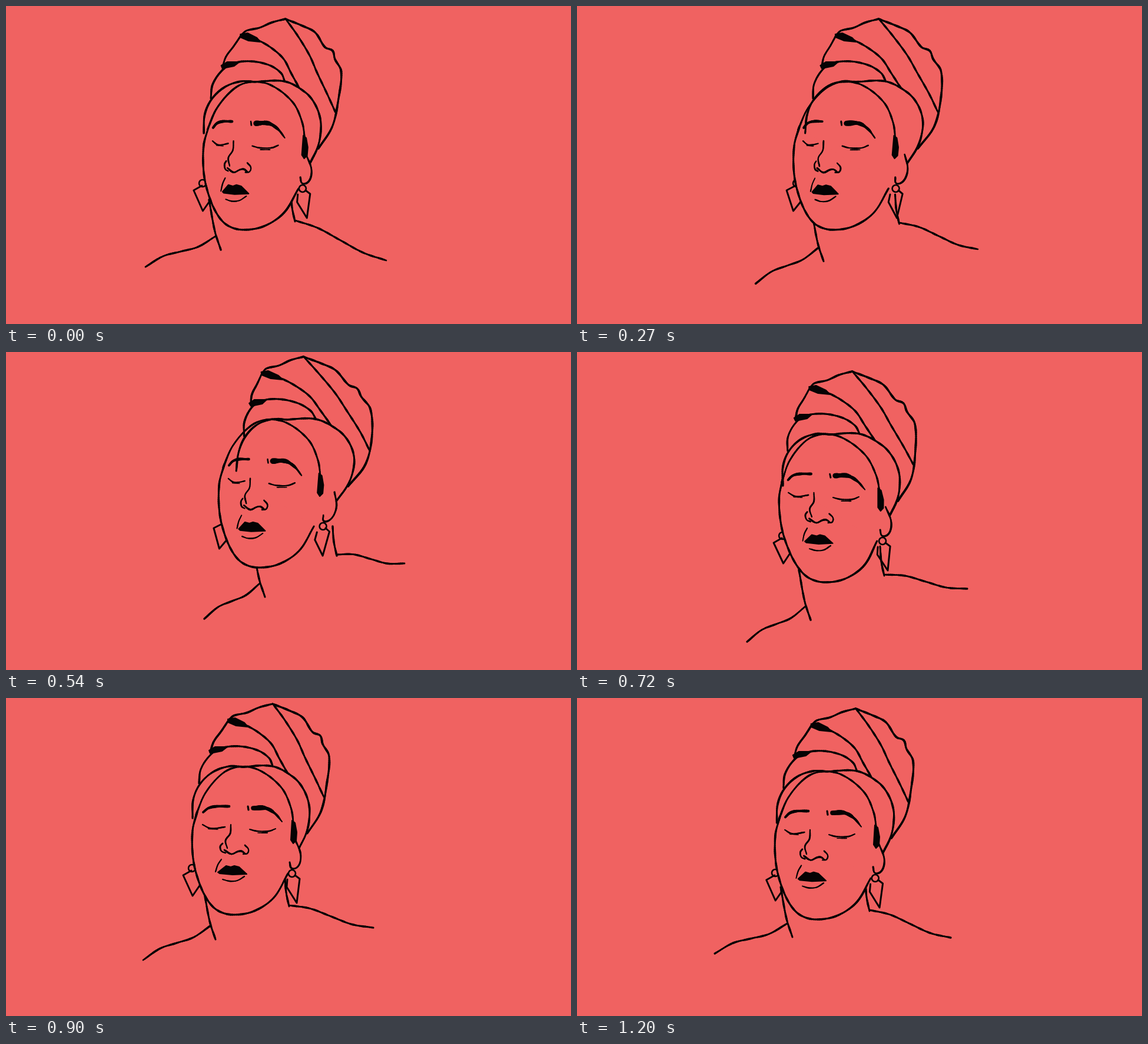
Animation, 960 px wide and 540 px high, one loop 1290 ms. Source, as an HTML page with a canvas:

```html
<!DOCTYPE html>
<html lang="en">
<head>
<meta charset="utf-8">
<title>Swaying singer</title>
<style>
html, body { margin: 0; width: 100%; height: 100%; overflow: hidden; background: #f06261; }
canvas { display: block; }
</style>
</head>
<body>
<canvas id="stage" width="960" height="540"></canvas>
<script>
const ctx = document.getElementById('stage').getContext('2d');
const PAPER = '#f06261', INK = '#050304', LOOP = 1290;
ctx.lineCap = ctx.lineJoin = 'round';

// head: chin x, chin y, face turn, turban turn, lean
// left, right: neck base and shoulder tip
const poses = [
  { head: [402, 380, 1.2, 0, .013], left: [356, 391, 237, 443], right: [491, 364, 646, 432] },
  { head: [425, 394, 1.25, .45, .025], left: [390, 416, 268, 485], right: [527, 380, 668, 432] },
  { head: [442, 366, 1.3, .95, .025], left: [430, 405, 339, 458], right: [568, 356, 694, 394] },
  { head: [428, 366, 1.05, 1.1, .017], left: [431, 393, 337, 453], right: [562, 344, 677, 359] },
  { head: [420, 391, .45, .3, -.06], left: [388, 432, 289, 492], right: [522, 378, 663, 402] },
  { head: [385, 368, 0, 0, 0], left: [347, 387, 233, 445], right: [481, 352, 624, 390] },
  { head: [405, 376, .5, .1, 0], left: [357, 383, 234, 434], right: [497, 360, 635, 407] }
];

// start time, position between poses, sway x, sway y
const steps = [
  [0, 0], [60, .5], [150, 1], [270, 1.5], [360, 2], [450, 2.5, 0, -6], [540, 3],
  [630, 3.5, 9, 30], [720, 4], [810, 4.5], [900, 5], [1020, 5.25, -12, -10],
  [1110, 5.5, -19, -15], [1200, 6]
];

const pairs = flat => flat.flatMap((v, i) => i % 2 ? [] : [[v, flat[i + 1]]]);

// Smooth brush line with uneven pressure; taper thins the far end.
function brush(pts, width, taper = 0) {
  const last = pts.length - 1;
  const dir = pts.map((p, i) => {
    const a = pts[Math.max(i - 1, 0)], b = pts[Math.min(i + 1, last)];
    const len = Math.hypot(b[0] - a[0], b[1] - a[1]) || 1;
    return [(b[0] - a[0]) / len, (b[1] - a[1]) / len];
  });
  let from = pts[0];
  for (let i = 0; i < last; i++) {
    const a = pts[i], b = pts[i + 1];
    const len = Math.hypot(b[0] - a[0], b[1] - a[1]), n = Math.ceil(len / 4) + 1;
    for (let k = 1; k <= n; k++) {
      const t = k / n, s = 1 - t;
      const to = [0, 1].map(c => s * s * s * a[c] + t * t * t * b[c]
        + 3 * s * s * t * (a[c] + dir[i][c] * len / 3)
        + 3 * s * t * t * (b[c] - dir[i + 1][c] * len / 3));
      const pressure = 1 + .13 * Math.sin(to[0] * .31 + to[1] * .23);
      ctx.lineWidth = width * pressure * (1 - taper * (i + t) / last);
      ctx.beginPath();
      ctx.moveTo(...from);
      ctx.lineTo(...to);
      ctx.stroke();
      from = to;
    }
  }
}

function polygon(pts, fill, width) {
  ctx.beginPath();
  pts.forEach(p => ctx.lineTo(...p));
  ctx.lineWidth = width;
  ctx.fillStyle = fill;
  if (fill) {
    ctx.closePath();
    ctx.fill();
  }
  if (width) ctx.stroke();
}

function hoop([[x, y]], r) {
  ctx.lineWidth = 2.6;
  ctx.beginPath();
  ctx.arc(x, y, r, 0, 7);
  ctx.stroke();
}

// Shoulder and neck side; bend sets the S-curve, neck the offsets from its base.
function drawSide([x, y, tipX, tipY], bend, neck) {
  const shoulder = [0, .25, .5, .75, 1].map(t =>
    [x + (tipX - x) * t, y + (tipY - y) * t + bend * Math.sin(2 * Math.PI * t)]);
  brush(shoulder, 3.1);
  brush(pairs(neck).map(([dx, dy]) => [x + dx, y + dy]), 3.2);
}

function drawHead([chinX, chinY, faceTurn, wrapTurn, lean]) {
  // Features slide sideways and shorten on the far side; the turban swings around the head.
  const zones = {
    head: (x, y) => [x, y],
    face: (x, y) => [x - faceTurn * (12 + Math.min(0, x + 10) / 4), y + faceTurn * .055 * (y + 185)],
    wrap: (x, y) => [x + wrapTurn * 28 * Math.sin(Math.PI * y / 400) ** 2, y]
  };
  const place = (zone, flat) => pairs(flat).map(p => {
    const [x, y] = zones[zone](...p);
    return [chinX + x - lean * y, chinY + y];
  });
  const line = (zone, width, flat, taper) => brush(place(zone, flat), width, taper);
  const blob = (zone, flat) => polygon(place(zone, flat), INK, 2);
  const earring = (hook, drop) => {
    hoop(place('wrap', hook), 6);
    polygon(place('wrap', drop), null, 3);
  };

  // far earring, hidden by the cheek as the head turns
  earring([-69, -79], [-70, -75, -84, -67, -68, -32, -55, -51]);
  const jaw = [-60, -175, -68, -143, -67, -95, -57, -55, -42, -24, -25, -7, 0, 0, 36, -6, 70, -29, 94, -70];
  polygon(place('head', jaw), PAPER, 0);
  line('head', 3.3, jaw);
  line('head', 3, [-62, -170, -46, -207, -17, -240, 10, -251, 44, -246, 82, -217, 99, -182, 104, -150]);
  blob('head', [101, -160, 106, -156, 109, -140, 108, -126, 103, -121, 99, -127]);

  // turban band
  line('wrap', 3.3, [-68, -164, -67, -195, -56, -221, -34, -242, -6, -252, 20, -251]);
  line('wrap', 3.3, [15, -251, 68, -252, 104, -233, 121, -212, 130, -186, 130, -160, 125, -138, 113, -113]);
  // folds
  line('wrap', 3.2, [-57, -223, -54, -247, -38, -271, -19, -283, 12, -286, 43, -279, 62, -266, 68, -253]);
  line('wrap', 3.2, [-38, -276, -32, -294, -19, -312, -7, -330]);
  line('wrap', 3.2, [-4, -331, 24, -321, 46, -308, 66, -290, 79, -266, 93, -241]);
  blob('wrap', [-8, -332, 4, -334, 20, -326, 26, -319, 6, -321, -8, -327]);
  blob('wrap', [-40, -279, -30, -285, -9, -285, -18, -278, -38, -274]);
  // crown and seam
  line('wrap', 3.3, [-6, -331, 2, -338, 24, -343, 45, -352, 68, -358]);
  line('wrap', 3.5, [68, -358, 98, -346, 119, -335, 136, -310, 149, -304, 153, -290,
    164, -269, 160, -222, 150, -175, 127, -138]);
  line('wrap', 3.1, [70, -356, 89, -330, 110, -296, 123, -267, 141, -230, 155, -200]);
  // ear
  line('wrap', 3, [106, -128, 115, -106, 115, -90, 109, -80, 100, -79, 97, -89]);
  earring([101, -70], [93, -60, 92, -47, 109, -20, 114, -61, 106, -67]);

  // brows and closed eyes
  line('face', 4.4, [-50, -174, -41, -181, -27, -184, -6, -184]);
  line('face', 9, [35, -181, 56, -181, 72, -172, 84, -158], .75);
  line('face', 2.8, [26, -184, 27, -178]);
  line('face', 2.4, [-51, -153, -39, -147, -27, -147, -13, -149]);
  line('face', 2.4, [29, -145, 41, -142, 62, -142, 73, -146]);
  line('face', 1.8, [-41, -146, -25, -145]);
  line('face', 1.8, [43, -139, 59, -139]);
  // nose
  line('face', 2.5, [-3, -153, -4, -138, -12, -126, -9, -113]);
  line('face', 2.5, [-17, -121, -21, -116, -19, -108, -12, -105]);
  line('face', 3, [-14, -110, -2, -103, 8, -107, 15, -108, 21, -104]);
  line('face', 2.5, [21, -118, 27, -111, 25, -104, 18, -103]);
  // mouth
  blob('face', [-25, -72, -11, -83, -3, -81, 3, -83, 11, -81, 24, -69, 0, -68, -22, -70]);
  line('face', 2.2, [-17, -60, -5, -57, 8, -58, 20, -65]);
  line('face', 2, [-19, -94, -25, -85, -29, -73]);
}

function drawStep([, at, dx = 0, dy = 0]) {
  const i = Math.floor(at), a = poses[i], b = poses[Math.ceil(at)];
  const mix = key => a[key].map((v, n) => v + (b[key][n] - v) * (at - i));
  ctx.setTransform(1, 0, 0, 1, 0, 0);
  ctx.fillStyle = PAPER;
  ctx.fillRect(0, 0, 960, 540);
  ctx.strokeStyle = INK;
  ctx.translate(dx, dy);
  drawSide(mix('left'), 5, [-11, -62, -1, -8, 9, 23]);
  drawSide(mix('right'), -4, [-7, -48, -5, -22, 0, 2]);
  drawHead(mix('head'));
}

let shown;
function tick() {
  const t = performance.now() % LOOP;
  const step = steps.findLast(s => s[0] <= t);
  if (step !== shown) drawStep(shown = step);
  requestAnimationFrame(tick);
}
tick();
</script>
</body>
</html>
```
